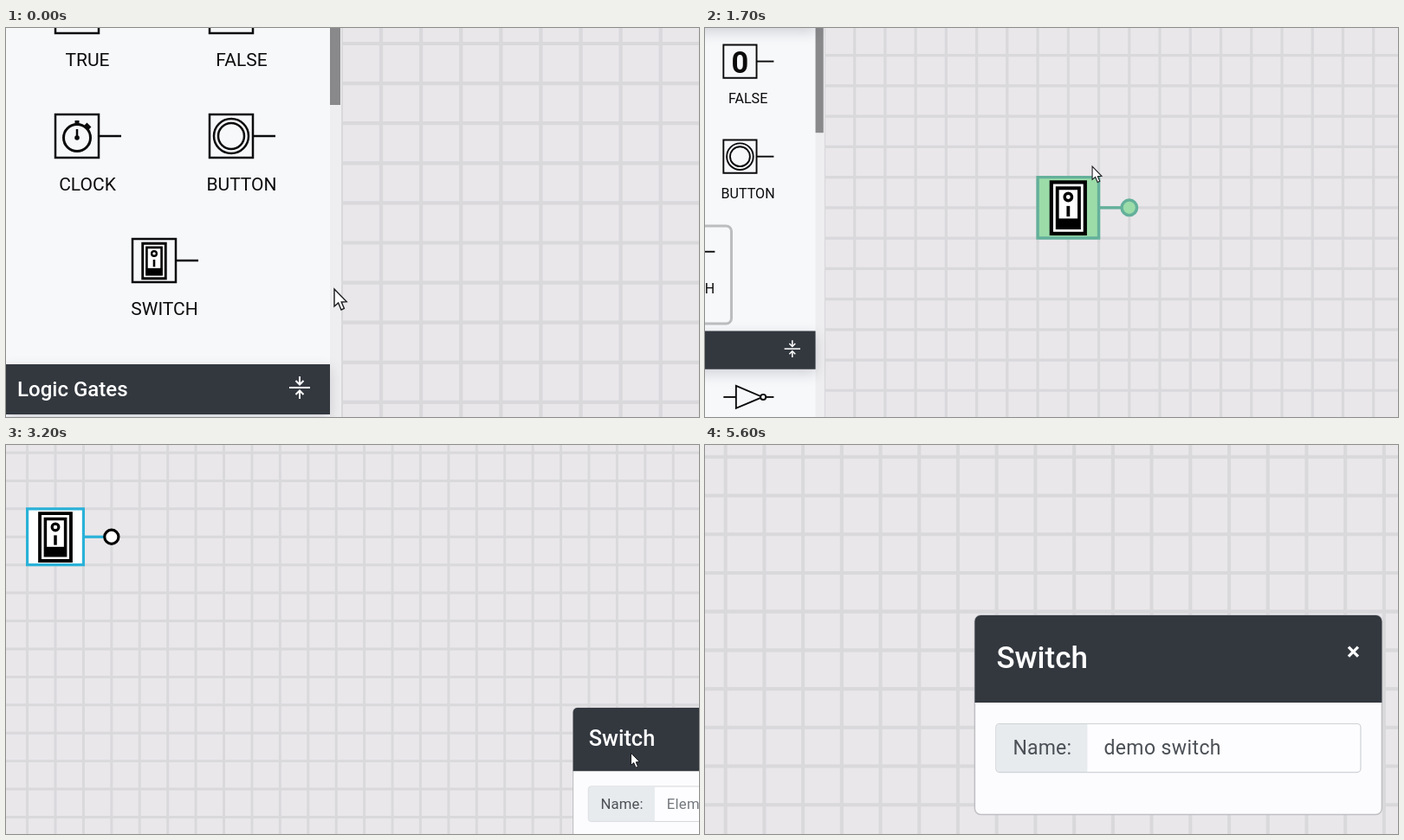
Recreate the animation shown at these times as an HTML page with a canvas. Size 800 by 450 pixels, loop 5700 ms.

```html
<!DOCTYPE html>
<html lang="en">
<head>
<meta charset="utf-8">
<title>Switch demo</title>
<style>
html, body { margin: 0; width: 100%; height: 100%; overflow: hidden; background: #e9e7ea; }
canvas { display: block; }
</style>
</head>
<body>
<canvas id="stage" width="800" height="450"></canvas>
<script>
const c = document.getElementById('stage').getContext('2d');
const LOOP = 5700, STEP = 100, CELL = 46.1;
const GRID_X = 433, GRID_Y = 18, EDGE = 387;
const DRAG = 900, DROP = 2150;
const INK = '#0b0b0c', DARK = '#33383f', PANEL = '#f7f8fa';
const FONT = 'Roboto, "Open Sans", sans-serif';

// Camera rectangles: left, top, width
const VIEWS = [[0, 0, 800], [470.7, -158, 1360.5], [1515, 234.3, 824.7]];
const ZOOM = [[0, 0], [600, 0], [1300, .211], [1700, .44], [2900, 1], [3500, 1.852], [3750, 2]];
const POINTER = [
  [0, 379, 302], [250, 379, 302], [700, 195, 270], [900, 195, 270], [1300, 498, 196],
  [1700, 792, 140], [2080, 1014, 105], [2300, 1014, 105], [2900, 1697, 362], [3500, 2049, 600]
];

// Monotone cubic interpolation of column d
function track(keys, t, d = 1) {
  const last = keys.length - 1;
  if (t >= keys[last][0]) return keys[last][d];
  const i = keys.findIndex(k => k[0] > t) - 1;
  const secant = j => (keys[j + 1][d] - keys[j][d]) / (keys[j + 1][0] - keys[j][0]);
  const slope = j => {
    if (j < 1 || j >= last) return 0;
    const a = secant(j - 1), b = secant(j);
    return a * b > 0 ? 2 * a * b / (a + b) : 0;
  };
  const h = keys[i + 1][0] - keys[i][0], u = (t - keys[i][0]) / h, v = 1 - u;
  return keys[i][d] * (1 + 2 * u) * v * v + keys[i + 1][d] * u * u * (3 - 2 * u)
    + h * u * v * (slope(i) * v - slope(i + 1) * u);
}

function box(x, y, w, h, fill, stroke, width = 2.5, radius = 0) {
  c.beginPath();
  c.roundRect(x, y, w, h, radius);
  paint(fill, stroke, width);
}

function disc(x, y, r, fill, stroke, width = 2.5) {
  c.beginPath();
  c.arc(x, y, r, 0, 7);
  paint(fill, stroke, width);
}

function path(points, fill, stroke, width = 2.5, close = false) {
  c.beginPath();
  for (let i = 0; i < points.length; i += 2) c.lineTo(points[i], points[i + 1]);
  if (close) c.closePath();
  paint(fill, stroke, width);
}

function paint(fill, stroke, width) {
  if (fill) { c.fillStyle = fill; c.fill(); }
  if (stroke) { c.strokeStyle = stroke; c.lineWidth = width; c.stroke(); }
}

function text(str, x, y, size, color, weight = 400, align = 'left', spacing = 0) {
  c.font = `${weight} ${size}px ${FONT}`;
  c.textAlign = align;
  c.letterSpacing = spacing + 'px';
  c.fillStyle = color;
  c.fillText(str, x, y);
}

function at(x, y, scale, draw) {
  c.save();
  c.translate(x, y);
  c.scale(scale, scale);
  draw();
  c.restore();
}

function rocker() {
  box(-25.5, -39, 51, 78, '#fff', '#000', 5.5);
  box(-16.5, -30, 33, 60, '#fff', '#000', 5);
  disc(0, -16.5, 5.5, null, '#000', 4.5);
  path([0, -3, 0, 13], null, '#000', 5);
  box(-18, 16, 36, 16, '#000');
}

function drawGrid(left, top, width) {
  c.fillStyle = '#e9e7ea';
  c.fillRect(left, top, width, width);
  c.beginPath();
  for (let x = GRID_X + CELL * Math.floor((left - GRID_X) / CELL); x < left + width + CELL; x += CELL) {
    c.moveTo(x, top);
    c.lineTo(x, top + width);
  }
  for (let y = GRID_Y + CELL * Math.floor((top - GRID_Y) / CELL); y < top + width; y += CELL) {
    c.moveTo(left, y);
    c.lineTo(left + width, y);
  }
  paint(null, '#d9d8db', 4.2);
}

function drawSwitch(t) {
  if (t < DRAG) return;
  const p = Math.min(t, 2100);
  const col = Math.round((track(POINTER, p, 1) - GRID_X) / CELL - 1.6);
  const row = Math.round((track(POINTER, p, 2) - GRID_Y) / CELL + .2);
  const held = t < DROP, edge = held ? '#64b09b' : '#2ab2d8', fill = held ? '#9bdca9' : '#fff';
  at(GRID_X + col * CELL, GRID_Y + row * CELL, 1, () => {
    path([2 * CELL, CELL, 3 * CELL - 12, CELL], null, edge, 4.5);
    box(0, 0, 2 * CELL, 2 * CELL, fill, edge, 4.5);
    disc(3 * CELL, CELL, 11.5, fill, held ? edge : '#000', 4.5);
    at(CELL, CELL + .4, 1, rocker);
  });
}

function item(x, y, label, icon) {
  at(x, y, 1, () => {
    box(-25, -25, 50, 50, null, INK);
    path([25, 0, 51, 0], null, INK);
    icon();
    text(label, 12, 63, 21, INK, 400, 'center');
  });
}

const digit = d => () => text(d, 0, 17, 45, INK, 700, 'center');

function clock() {
  disc(0, 2, 15.5, null, INK, 3);
  disc(0, 2, 2.8, INK);
  path([0, 2, 0, -8], null, INK, 2.5);
  path([0, -13, 0, -18], null, INK, 5);
  path([10, -14, 15, -9], null, INK, 4);
}

function button() {
  disc(0, 0, 20, null, INK);
  disc(0, 0, 15, null, INK);
}

function header(y, title) {
  c.save();
  c.shadowColor = 'rgba(40,40,60,.18)';
  c.shadowBlur = 14;
  c.shadowOffsetY = 5;
  box(0, y, 374, 58, DARK);
  c.restore();
  text(title, 13, y + 37, 24, '#fff', 500);
  at(339, y + 27, 1, () => {
    path([-12, 0, 12, 0], null, '#fff', 2);
    for (const s of [-1, 1]) {
      path([0, 13 * s, 0, 4 * s], null, '#fff', 2);
      path([-4.5, 8 * s, 0, 3.5 * s, 4.5, 8 * s], null, '#fff', 2);
    }
  });
}

function gate(x, y, inverted) {
  at(x, y, 1, () => {
    path([-25, 0, -6, 0], null, INK);
    path([-6, -17, 34, 0, -6, 17], null, INK, 2.5, true);
    path([inverted ? 39 : 34, 0, 51, 0], null, INK);
    if (inverted) disc(35, 0, 4, PANEL, INK);
  });
}

function drawSidebar(t) {
  c.fillStyle = PANEL;
  c.fillRect(0, -400, EDGE, 1400);
  c.fillStyle = '#eeeef0';
  c.fillRect(374, -400, EDGE - 374, 1400);
  c.fillStyle = '#89888a';
  c.fillRect(374, -70, 12, 159);
  header(-128, '');
  item(82, -19, 'TRUE', digit('1'));
  item(260, -19, 'FALSE', digit('0'));
  item(82, 125, 'CLOCK', clock);
  item(260, 125, 'BUTTON', button);
  if (t >= 600) box(121, 230, 126, 148, null, '#bcbdbf', 4, 8);
  item(171, 269, 'SWITCH', () => at(0, .5, .52, rocker));
  header(389, 'Logic Gates');
  gate(82, 489, false);
  gate(260, 489, true);
}

function drawDialog(t) {
  // Four letters, a pause, then the rest
  const keyed = Math.floor((t - 4200) / STEP);
  const count = keyed <= 4 ? keyed : Math.max(4, keyed - 1);
  const typed = count > 0 ? 'demo switch'.slice(0, count) : '';
  at(1836, 437.4, 1 / .97, () => {
    box(0, 0, 470, 230.5, '#fcfbfd', '#bfbfc3', 1.5, 7);
    box(0, 0, 470, 101, DARK, null, 0, [7, 7, 0, 0]);
    text('Switch', 25, 61, 35, '#fff', 500);
    path([431.5, 36.5, 442.5, 47.5], null, '#fff', 3.2);
    path([442.5, 36.5, 431.5, 47.5], null, '#fff', 3.2);
    box(24.5, 125.5, 421, 56, '#fdfcfe', '#ced2d6', 1.2, 4);
    box(25, 126, 105, 55, '#e7ebee', null, 0, [4, 0, 0, 4]);
    text('Name:', 44, 161, 23, '#4b5056', 400, 'left', .2);
    text(typed || 'Element Name', 149, 161, 23, typed ? '#4b5056' : '#73787d', 400, 'left', .4);
  });
}

function drawPointer(t) {
  if (t >= 3900) return;
  const x = track(POINTER, t, 1), y = track(POINTER, t, 2);
  at(x, y, 1, () => {
    if (x > 1970 && y > 566) {
      path([0, -10, 0, 10], null, '#222', 2);
      for (const s of [-1, 1]) path([-4, 11 * s, 0, 10 * s, 4, 11 * s], null, '#222', 1.8);
    } else {
      path([0, 0, 0, 20, 4.6, 16, 8, 24, 11.4, 22.5, 8.2, 15, 14.2, 14.6], '#fff', '#1a1a1e', 1.4, true);
    }
  });
}

function render(t) {
  const z = track(ZOOM, t), i = z < 1 ? 0 : 1;
  const [left, top, width] = VIEWS[i].map((v, d) => v + (VIEWS[i + 1][d] - v) * (z - i));
  const k = 800 / width;
  c.setTransform(k, 0, 0, k, -left * k, -top * k);
  drawGrid(left, top, width);
  drawSwitch(t);
  drawSidebar(t);
  drawDialog(t);
  drawPointer(t);
}

const start = performance.now();
function frame() {
  const t = (performance.now() - start) % LOOP;
  render(Math.floor(t / STEP) * STEP);
  requestAnimationFrame(frame);
}
frame();
</script>
</body>
</html>
```
